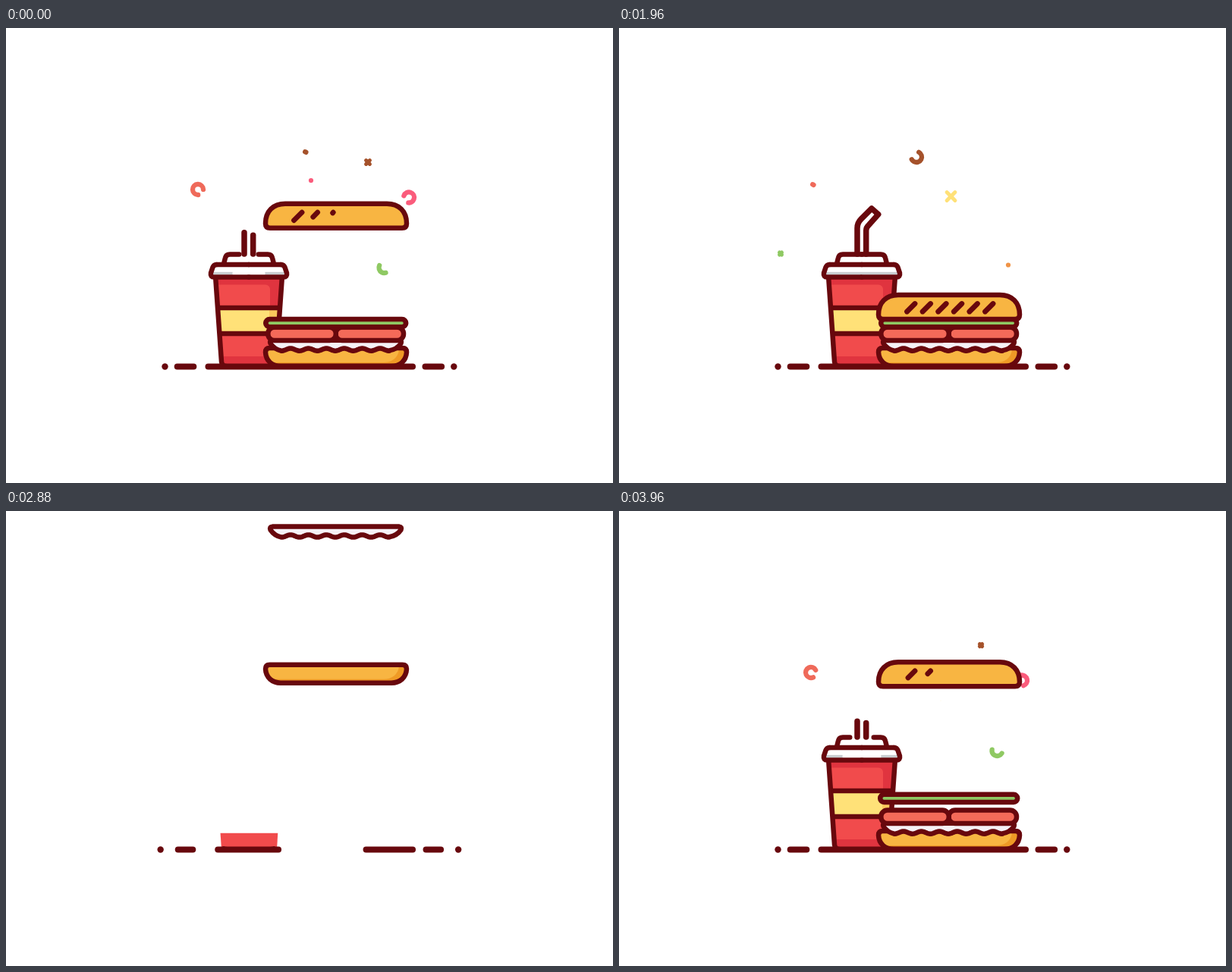
Recreate the animation shown at these times as an HTML page with a canvas. Size 800x600 px, loop 4 s.

```html
<!DOCTYPE html>
<html lang="en">
<head>
<meta charset="utf-8">
<title>Lunch</title>
<style>
  html, body { margin: 0; width: 100%; height: 100%; overflow: hidden; background: #fff; }
  canvas { display: block; width: 800px; height: 600px; }
</style>
</head>
<body>
<canvas id="stage" width="800" height="600"></canvas>
<script>
const ctx = document.getElementById('stage').getContext('2d');
const LOOP = 4000, EXIT = 2000, RESTART = 2600;
const INK = '#68080d', BUN = '#f8b542', BUN_DARK = '#ef9a26', RED = '#f14b4c', RED_DARK = '#e0343f';
const GREEN = '#8fc963', CORAL = '#ef6a5a', PINK = '#fa5c7c', BROWN = '#a5522b', YELLOW = '#ffe178', ORANGE = '#f09346';

// Progress from 0 to 1 between two times.
const span = (t, from, to) => Math.min(1, Math.max(0, (t - from) / (to - from)));
const mix = (a, b, p) => a + (b - a) * p;

function stroke(path, width = 6.5, color = INK) {
  ctx.strokeStyle = color;
  ctx.lineWidth = width;
  ctx.stroke(path);
}

function fill(path, color) {
  ctx.fillStyle = color;
  ctx.fill(path);
}

// Strokes only the first part of a path.
function trim(path, length, width) {
  if (length <= 0) return;
  ctx.setLineDash([length, 2000]);
  stroke(path, width);
  ctx.setLineDash([]);
}

function line(x1, y1, x2, y2, width, color) {
  const p = new Path2D();
  p.moveTo(x1, y1);
  p.lineTo(x2, y2);
  stroke(p, width, color);
}

function dot(x, y, r, color) {
  const p = new Path2D();
  p.arc(x, y, r, 0, 7);
  fill(p, color);
}

function pill(x, y, w, h, r) {
  const p = new Path2D();
  p.roundRect(x, y, w, h, r);
  return p;
}

// Draws once as is and once mirrored around the cup's axis.
function both(draw) {
  draw();
  ctx.save();
  ctx.translate(640, 0);
  ctx.scale(-1, 1);
  draw();
  ctx.restore();
}

// ---- Confetti: each kind draws itself for a progress p ----
function curl(x, y, color, p) {
  const path = new Path2D(), first = -0.4 * Math.PI, turn = 3.69 * Math.PI;
  path.arc(x, y, 7, first + turn * p * p, first + turn * (1 - (1 - p) ** 1.55));
  stroke(path, 6.3, color);
}

function cross(x, y, color, p) {
  const inner = 9.5 * p * p, outer = 9.5 * (1 - (1 - p) ** 2.5);
  for (let i = 0; i < 4; i++) {
    const a = Math.PI * (0.25 + i / 2), c = Math.cos(a), s = Math.sin(a);
    line(x + c * inner, y + s * inner, x + c * outer, y + s * outer, 5 * (1 - p ** 6), color);
  }
}

function pop(x, y, color, p) {
  dot(x, y, 3.1 * Math.min(1, 4 * Math.sin(Math.PI * p)), color);
}

const LIFE = new Map([[curl, 1050], [cross, 640], [pop, 680]]);

// kind, x, y, color, first birth, repeat time
const BITS = [
  [curl, 253, 213, CORAL, 3485, 1232],
  [curl, 531, 223.5, PINK, 3330],
  [curl, 498.5, 316, GREEN, 3085],
  [curl, 392, 170, BROWN, 3990, 1188],
  [cross, 477, 177, BROWN, 3895, 1290],
  [cross, 213, 297.5, GREEN, 3068, 1416],
  [cross, 437.5, 222, YELLOW, 5655],
  [pop, 300, 272.3, YELLOW, 3118],
  [pop, 402, 201, PINK, 3860],
  [pop, 424, 250, YELLOW, 3955],
  [pop, 489, 319, PINK, 5020],
  [pop, 513, 312.5, ORANGE, 5760]
];

function confetti(u) {
  for (const [kind, x, y, color, birth, every = LOOP] of BITS) {
    const p = (u - birth) % every / LIFE.get(kind);
    if (p > 0 && p < 1) kind(x, y, color, p);
  }
}

// ---- Cup ----
const CUP = new Path2D('M276 329H364L357 446H284Z');
const CUP_SIDE = new Path2D('M290 446Q284.5 446 284 440L276.3 331');
const LID_SIDE = new Path2D('M320 328.5H274.5Q269 328.5 270 323L272.5 315.5Q274 312 278 312');
const LID_TOP = new Path2D('M320 312H278');
const DOME_SIDE = new Path2D('M287.5 309L289 303Q290 298.5 295 298.5H320');
const STRAW_L = new Path2D('M314 298V264Q314 257 319 252L333 238L341.5 245.5');
const STRAW_R = new Path2D('M325.7 298V267Q325.7 263 329 260L341.5 246');

function cupFill(u) {
  const top = mix(446, 328, span(u, 2780, 3340)), shade = span(u, 3200, 3480);
  ctx.save();
  ctx.beginPath();
  ctx.rect(260, top, 120, 446 - top);
  ctx.clip();
  ctx.clip(CUP);
  ctx.fillStyle = RED;
  ctx.fillRect(260, 320, 120, 130);
  ctx.globalAlpha = shade;
  const rim = new Path2D();
  rim.rect(200, 320, 200, 130);
  rim.roundRect(200, 338.5, 148, 94.5, 6);
  ctx.fillStyle = RED_DARK;
  ctx.fill(rim, 'evenodd');
  ctx.globalAlpha = 1;
  ctx.fillStyle = YELLOW;
  ctx.fillRect(260, 369, 120, 34);
  ctx.globalAlpha = shade;
  ctx.fillStyle = '#fcc95c';
  ctx.fillRect(347, 369, 30, 34);
  ctx.restore();
}

function cup(u) {
  cupFill(u);
  const low = span(u, 3080, 3340), high = span(u, 3070, 3340);
  if (low) line(282.5, 403, mix(282.5, 357.5, low), 403);
  if (high) line(360.5, 369, mix(360.5, 279.5, high), 369);

  ctx.fillStyle = '#c8cccf';
  both(() => {
    trim(CUP_SIDE, 120 * span(u, 2870, 3370));
    ctx.fillStyle = '#c8cccf';
    ctx.fillRect(273, 321.8, 47 * span(u, 3740, 4220), 4);
    trim(LID_SIDE, 68 * span(u, 3115, 3560));
    trim(LID_TOP, 43 * span(u, 3115, 3690) ** 2);
    trim(DOME_SIDE, 41 * span(u, 3640, 4200));
  });
  trim(STRAW_L, 82 * span(u, 3850, 4290), 7.5);
  trim(STRAW_R, 66 * span(u, 3840, 4270), 7.5);
}

// ---- Sandwich ----
const BASE = new Path2D('M347.5 422H522.5Q528 422 528 427.5C527.5 439 519 446 508 446H362C351 446 342.5 439 342 427.5Q342 422 347.5 422Z');
const BASE_LIGHT = new Path2D('M335 418H518V424C517 435 508 441 498 441H335Z');
const TOP = new Path2D('M348 384Q342 384 342 378C342 362 352 352 368 352H502C518 352 528 362 528 378Q528 384 522 384Z');
const MAYO = new Path2D('M351 411.7H518.5Q522 412 520.5 416Q515 424 505 425.4');
for (let x = 505; x >= 363; x--) {
  MAYO.lineTo(x, 424.1 + 1.6 * Math.cos(2 * Math.PI * (x - 434) / 23.6));
}
MAYO.quadraticCurveTo(354, 424, 348.5, 416);
MAYO.quadraticCurveTo(347, 412, 351, 411.7);
MAYO.closePath();

// Falls into place, slowing down, and widens a little on landing.
function drop(u, land, draw, cx = 434.5) {
  const left = Math.max(0, land - u), height = 0.89 * left * left / (left + 94);
  if (height > 480) return;
  ctx.save();
  ctx.translate(cx, -height);
  ctx.scale(1 + 0.032 * Math.sin(Math.PI * span(u, land - 50, land + 50)), 1);
  ctx.translate(-cx, 0);
  draw();
  ctx.restore();
}

function slice(path, color) {
  fill(path, color);
  stroke(path);
}

function base() {
  fill(BASE, BUN_DARK);
  ctx.save();
  ctx.clip(BASE);
  fill(BASE_LIGHT, BUN);
  ctx.restore();
  stroke(BASE);
}

function topBun(u) {
  slice(TOP, BUN);
  for (let i = 0; i < 6; i++) {
    const x = 390 + 20.6 * i, y = 363.5, grow = span(u - 100 * i, 3790, 3990);
    if (grow) line(x, y, x - 10.5 * grow, y + 10.5 * grow, 6.8);
  }
}

function sandwich(u) {
  const tomato = x => slice(pill(x, 394.5, 89.5, 17.5, 8.5), '#f46a59');
  drop(u, 3200, base);
  drop(u, 3400, () => slice(MAYO, '#f6f1f6'));
  drop(u, 3600, () => tomato(434.5), 479);
  drop(u, 3800, () => tomato(345.3), 390);
  drop(u, 4000, () => slice(pill(345.2, 384, 179, 10.2, 5), GREEN));
  drop(u, 4200, () => topBun(u));
}

// ---- Ground ----
const FLOOR = 446.5;

function floorLine(x1, x2) {
  line(x1, FLOOR, x2, FLOOR, 8);
}

function floorEnds(spread, size, dash) {
  dot(209.5 - spread, FLOOR, 4.2 * size, INK);
  dot(590.3 + spread, FLOOR, 4.2 * size, INK);
  if (!dash) return;
  for (const x of [236.5, 563.3]) floorLine(x - 10.8 * dash, x + 10.8 * dash);
}

function oldFloor(t) {
  const p = span(t, 2080, 2640);
  ctx.save();
  ctx.beginPath();
  ctx.rect(189, 400, 611, 100);
  ctx.clip();
  ctx.translate(-405 * p * p * (3 - 2 * p), 0);
  floorEnds(0, 1, 1);
  floorLine(266.5, 536);
  ctx.restore();
}

function newFloor(t) {
  const left = mix(320, 266.5, span(t, 2500, 3000));
  const middle = mix(320, 403, span(t, 2500, 3310));
  const right = mix(536, 403, span(t, 2620, 3185));
  floorEnds(6.7 * Math.sin(Math.PI * span(t, 2510, 3070)), span(t, 2550, 2590), span(t, 2700, 2900));
  if (middle >= right) {
    floorLine(left, 536);
    return;
  }
  if (t > 2540) floorLine(left, middle);
  if (right < 536) floorLine(right, 536);
}

function render(t) {
  const u = t < RESTART ? t + LOOP : t;
  ctx.fillStyle = '#fff';
  ctx.fillRect(0, 0, 800, 600);
  ctx.lineCap = ctx.lineJoin = 'round';

  ctx.save();
  if (u > LOOP + EXIT) ctx.translate(-0.0019 * (t - EXIT) ** 2, 0);
  confetti(u);
  cup(u);
  sandwich(u);
  ctx.restore();

  if (t < 2640) oldFloor(t);
  if (t > 2500) newFloor(t);
}

const start = performance.now();
function tick() {
  render((performance.now() - start) % LOOP);
  requestAnimationFrame(tick);
}
tick();
</script>
</body>
</html>
```
